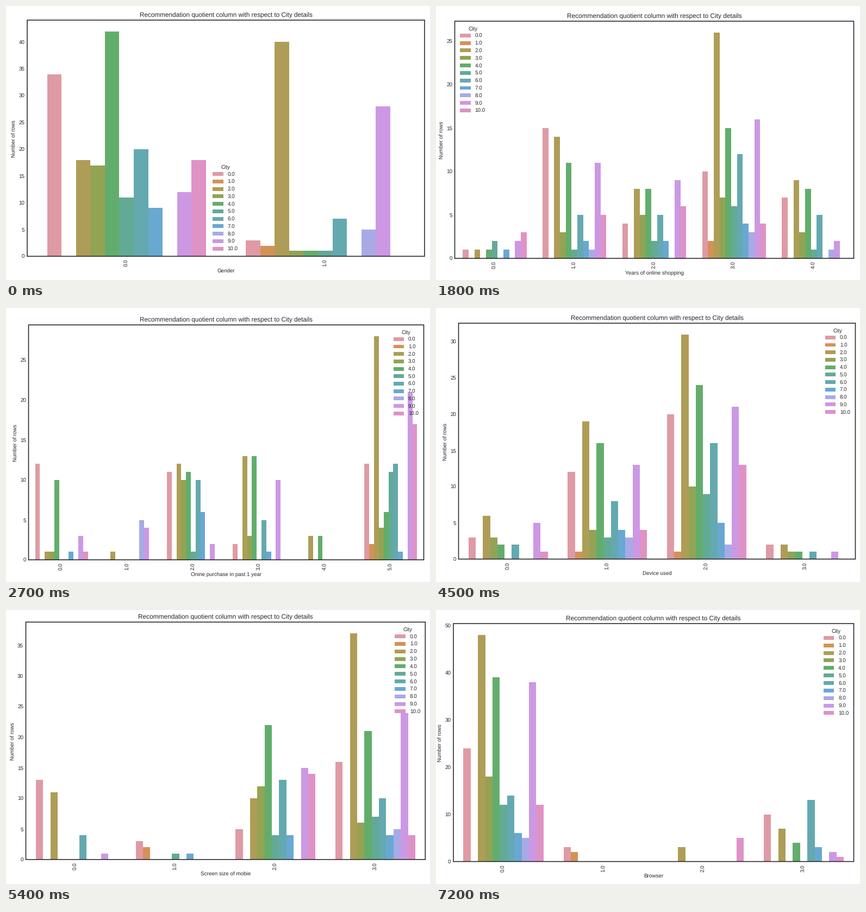
Write a matplotlib script that moves like this. It is 780x505 px and loops after 8 s.

```python
import matplotlib.pyplot as plt
import numpy as np
from matplotlib.animation import FuncAnimation
from matplotlib.patches import Rectangle

W, H, DPI = 780, 505, 100
PT = 72 / DPI  # points per pixel
INK = "#262626"
COLORS = ["#df9aa5", "#d39257", "#ae9d56", "#93a354", "#62ad6c", "#63aa96",
          "#64a9b0", "#68a8d2", "#a8aae6", "#cc98e4", "#df92c6"]
CITIES = "abcdefghijk"
TOTALS = np.array([37, 2, 58, 18, 43, 12, 27, 9, 5, 40, 18])
TITLE = "Recommendation quotient column with respect to City details"
INTERVAL, HOLD, LOOP = 100, 900, 8000

plt.rcParams["font.family"] = "Liberation Sans"
plt.rcParams["text.hinting"] = "none"

fig = plt.figure(figsize=(W / DPI, H / DPI), dpi=DPI, facecolor="white")
ax = fig.add_axes([0, 0, 1, 1])
ax.set_xlim(0, W)
ax.set_ylim(H, 0)
ax.set_axis_off()
rng = np.random.default_rng(8)


def label(x, y, text, size, ha="center", va="center_baseline", rotation=0):
    return ax.text(x, y, text, fontsize=size * PT, color=INK, ha=ha, va=va,
                   rotation=rotation, zorder=5)


def block(x, y, w, h, color, zorder=1):
    return ax.add_patch(Rectangle((x, y), w, h, facecolor=color, linewidth=0,
                                  zorder=zorder))


def survey(rest, *groups):
    """Counts per group; the group at index rest takes everyone not listed."""
    rows = [np.array([group.get(c, 0) for c in CITIES]) for group in groups]
    rows.insert(rest, TOTALS - sum(rows))
    return np.array(rows)


def sample(*shares):
    """Split every city at random among groups of the given shares."""
    return rng.multinomial(TOTALS, shares).T


def legend(left, right, top, bottom, loc, size):
    row, column = loc.split()
    x = {"left": left + 9.5, "center": (left + right) / 2 - 24.5,
         "right": right - 56}[column]
    y = top + 13 if row == "upper" else bottom - 165
    parts = [label(x + 23.7, y, "City", size)]
    for i, color in enumerate(COLORS):
        cy = y + 1.35 * size + 1.4 * size * i
        parts.append(block(x, cy - 0.35 * size, 2 * size, 0.7 * size, color, 4))
        parts.append(label(x + 2.8 * size, cy + 0.3, f"{i:.1f}", size, ha="left"))
    return parts


def chart(name, left, right, top, loc, counts):
    width = right - left
    height = 0.5955 * width
    bottom, middle = top + height, (left + right) / 2
    size = 10 * width / 744
    peak = counts.max() * 1.05
    unit = height / peak
    slot = width / len(counts)
    bar = 0.8 * slot / len(CITIES)

    parts = []
    for k, group in enumerate(counts):
        center = left + (k + 0.5) * slot
        parts.append(label(center, bottom + 5.3, f"{k:.1f}", size, va="top",
                           rotation=90))
        for i, n in enumerate(group):
            if n:
                x = center - 0.4 * slot + i * bar
                parts.append(block(x, bottom - n * unit, bar, n * unit, COLORS[i]))
    for tick in range(0, int(peak) + 1, 5 if peak < 50 else 10):
        parts.append(label(left - 4.5, bottom - tick * unit + 0.4, str(tick),
                           size, ha="right"))

    parts.append(ax.add_patch(Rectangle(
        (left, top), width, height, fill=False, edgecolor=INK,
        linewidth=1.6 * PT, snap=False, zorder=3)))
    parts.append(label(middle, top - 5.4, TITLE, 1.2 * size, va="baseline"))
    parts.append(label(middle, bottom + 25.7, name, size))
    parts.append(label(left - 24.4, top + height / 2 + 1, "Number of rows",
                       size, va="center", rotation=90))
    return parts + legend(left, right, top, bottom, loc, size)


gender = survey(1, dict(a=34, c=18, d=17, e=42, f=11, g=20, h=9, j=12, k=18))
age = survey(1, dict(a=21, c=12, d=1, e=14, g=15, h=5, j=5, k=6),
             dict(a=12, c=23, d=5, e=12, g=4, h=3, j=11),
             dict(a=3, f=11, g=1, j=4),
             dict(a=1, c=4, d=4, j=3, k=8))
purchases = survey(5, dict(a=12, c=1, d=1, e=10, h=1, j=3, k=1),
                   dict(c=1, i=5, j=4),
                   dict(a=11, c=12, d=10, e=11, f=1, g=10, h=6, j=2),
                   dict(a=2, c=13, d=3, e=13, g=5, h=1, j=10),
                   dict(c=3, e=3))
access = survey(1, dict(c=4),
                dict(a=29, c=28, d=1, e=29, g=19, h=9, j=27),
                dict(a=7, c=21, d=7, e=7, f=12, g=1, j=12, k=9))
screen = survey(3, dict(a=13, c=11, g=4, j=1),
                dict(a=3, b=2, f=1, h=1),
                dict(a=5, c=10, d=12, e=22, f=4, g=13, h=4, j=15, k=14))
browser = survey(0, dict(a=3, b=2), dict(c=3, k=5),
                 dict(a=10, c=7, e=4, g=13, h=3, j=2, k=1))
years = sample(0.06, 0.24, 0.17, 0.37, 0.16)
device = sample(0.11, 0.32, 0.53, 0.04)
system = sample(0.32, 0.23, 0.45)

slides = [
    chart("Gender", 39, 770, 26, "lower center", gender),
    chart("Age", 39, 771.5, 28.3, "upper left", age),
    chart("Years of online shopping", 34.5, 768.5, 28, "upper left", years),
    chart("Onine purchase in past 1 year", 41.5, 768.5, 31.2, "upper right",
          purchases),
    chart("Mode of internet access", 41.5, 769, 28.4, "upper center", access),
    chart("Device used", 41.5, 771.5, 28, "upper right", device),
    chart("Screen size of mobie", 36.5, 771.3, 22.3, "upper right", screen),
    chart("Operating system", 32, 771.5, 23.5, "upper left", system),
    chart("Browser", 32, 768.5, 25, "upper right", browser),
]


def update(frame):
    current = frame * INTERVAL // HOLD
    for k, parts in enumerate(slides):
        for part in parts:
            part.set_visible(k == current)
    return []


update(0)
anim = FuncAnimation(fig, update, frames=LOOP // INTERVAL, interval=INTERVAL,
                     repeat=True, repeat_delay=0, blit=False)
plt.show()
```
